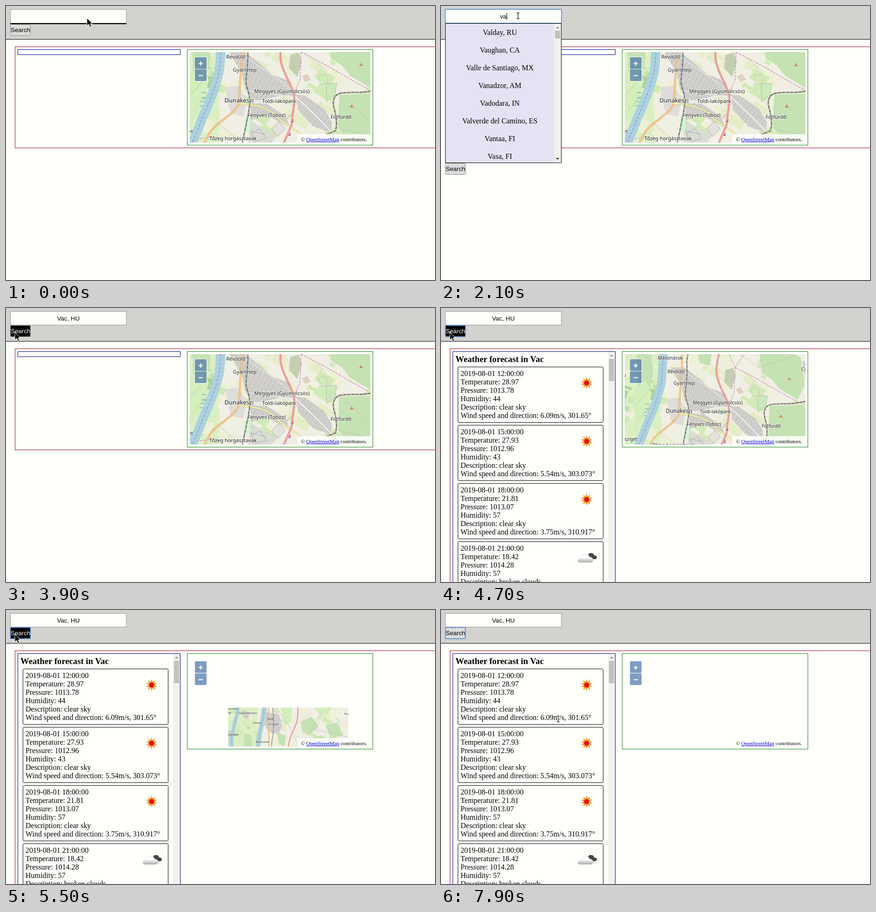
An HTML page for the animation above (8000 ms loop, 922 by 588 pixels).

```html
<!DOCTYPE html>
<html lang="en">
<head>
<meta charset="utf-8">
<style>
html, body { margin: 0; width: 100%; height: 100%; overflow: hidden; background: #fffffc; }
svg { display: block; }
text { white-space: pre; }
.sans { font: 13.33px "Liberation Sans", Arial, sans-serif; }
.serif { font: 16px "Liberation Serif", "Times New Roman", serif; }
.label { font: 11px "Noto Sans", sans-serif; fill: #222; stroke: #fff; stroke-width: 2px; stroke-opacity: .6; paint-order: stroke; text-anchor: middle; }
.mid { text-anchor: middle; }
#map path { fill: none; stroke-linejoin: round; }
</style>
</head>
<body>
<svg width="922" height="588" viewBox="0 0 922 588">
  <defs>
    <clipPath id="view"><rect x="395" y="99" width="388" height="194"/></clipPath>
    <clipPath id="tiles"><rect x="334" y="-69" width="512" height="512"/></clipPath>
    <pattern id="streets" width="9" height="5" patternUnits="userSpaceOnUse" patternTransform="rotate(28)">
      <rect width="9" height="5" fill="#d5d3d0"/>
      <path d="M0 .5H9M.5 0V5" style="stroke:#bdbbb9;stroke-width:.8"/>
    </pattern>
    <g id="arrow"><path d="M0 0V16.5L4 13L6.8 19L9.6 17.7L7 12H12Z" fill="#000" stroke="#fff"/></g>
    <g id="beam">
      <path d="M-3 -6.5H-1L0 -5.5L1 -6.5H3M0 -5.5V5.5M-3 6.5H-1L0 5.5L1 6.5H3" fill="none" stroke="#fff" stroke-width="3"/>
      <path d="M-3 -6.5H-1L0 -5.5L1 -6.5H3M0 -5.5V5.5M-3 6.5H-1L0 5.5L1 6.5H3" fill="none" stroke="#000" stroke-width="1.2"/>
    </g>
    <g id="hand"><path d="M-2 1Q-2 -1 0 -1Q2 -1 2 1V5L8 6.500Q10 7 9.500 10L8 15H-1L-6 9Q-7 7 -5 7L-2 9Z" fill="#000" stroke="#fff" stroke-width="1.1"/></g>
    <g id="sun">
      <path id="rays" fill="#f5a51c" stroke="#c98214" stroke-width=".5"/>
      <circle r="6" fill="#e80c08" stroke="#f6c030"/>
    </g>
    <linearGradient id="mist" x2="0" y2="1"><stop offset=".4" stop-color="#fff"/><stop offset="1" stop-color="#aaa"/></linearGradient>
    <g id="cloud">
      <path d="M0 3Q-4 2 -3 -2Q-1 -5 2 -5Q4 -10 9 -9Q14 -9 15 -4Q21 -4 21 1Q20 4 17 4H2Z" fill="#454545"/>
      <path d="M-16 11Q-21 10 -20 6Q-18 2 -14 2Q-13 -6 -5 -7Q3 -8 5 -1Q13 0 13 7Q12 11 8 11Z" fill="url(#mist)" stroke="#ccc" stroke-width=".6"/>
    </g>
  </defs>
  <g id="page"></g>
  <g clip-path="url(#view)"><g id="map" clip-path="url(#tiles)"></g></g>
  <g id="controls"></g>
  <g id="ui"></g>
</svg>
<script>
const LOOP = 8000;
const $ = id => document.getElementById(id);
const rect = (x, y, w, h, fill, extra = '') => `<rect x="${x}" y="${y}" width="${w}" height="${h}" fill="${fill}" ${extra}/>`;
// A box with a 1px border inside the given bounds
const box = (x, y, w, h, stroke, fill = 'none', r = 0) =>
  rect(x + .5, y + .5, w - 1, h - 1, fill, `stroke="${stroke}" rx="${r}"`);
const text = (x, y, s, cls, extra = '') => `<text x="${x}" y="${y}" class="${cls}" ${extra}>${s}</text>`;
const shape = (d, fill, extra = '') => `<path d="${d}" style="fill:${fill}" ${extra}/>`;
const line = (d, color, width, dash = '') =>
  `<path d="${d}" stroke="${color}" stroke-width="${width}" stroke-dasharray="${dash}"/>`;
const road = (d, edge, color, width) => line(d, edge, width + 1) + line(d, color, width);
const ease = u => u * u * (3 - 2 * u);
const at = (keys, t) => keys.filter(k => k[0] <= t).pop();

$('rays').setAttribute('d', 'M' + Array.from({ length: 20 }, (_, i) => {
  const a = i * Math.PI / 10, r = i % 2 ? 6.5 : 12;
  return (r * Math.sin(a)).toFixed(1) + ' ' + (-r * Math.cos(a)).toFixed(1);
}).join('L') + 'Z');

function fields() {
  let seed = 7, out = '';
  const rnd = () => (seed = seed * 16807 % 2147483647) / 2147483647;
  const west = ['#cdebb0', '#d5eab8', '#eef0d5', '#bfe0a8', '#add19e'];
  const east = ['#eef0d5', '#f2efe9', '#eef0d5', '#e4ecc8', '#d2eab8'];
  for (let i = 0; i < 190; i++) {
    const x = 334 + 512 * rnd(), y = -69 + 370 * rnd();
    const kinds = x < 460 ? west : east;
    out += rect(x, y, 10 + 32 * rnd(), 6 + 20 * rnd(), kinds[rnd() * 5 | 0],
      `transform="rotate(${x < 460 ? 18 : 32} ${x} ${y})"`);
  }
  return out;
}

function drawMap() {
  const danube = 'M488 -70C485 -30 474 10 467 50C459 90 463 120 457 145C447 185 433 215 422 240C414 265 404 282 396 305';
  const arm = 'M376 -70C372 -20 350 20 348 75C350 120 372 150 364 205L348 245';
  const motorway = 'M631 -70C633 -30 628 0 612 27C598 55 588 85 590 114C594 142 612 165 619 190C622 212 614 235 614 255L596 296';
  const mainRoad = 'M507 -70C500 -30 501 10 507 45C512 80 502 150 501 209C488 237 450 250 438 272L424 298';
  const rail = 'M524 -70C529 -20 530 30 519 85C524 130 511 155 518 175C530 205 521 225 516 255L507 298';
  const loop = 'M850 172L783 183C760 188 745 183 720 187C704 190 702 204 704 215C710 235 712 255 708 268L690 275';
  const town = 'url(#streets)', wood = '#c5e2b3', meadow = '#d3efbc';
  const labels = [
    [494, 113, 'Révdűlő'], [513, 141, 'Gyártelep'], [593, 187, 'Meggyes (Gyümölcsös)'], [587, 208, 'Toldi-lakópark'],
    [560, 238, 'Fenyves (Toboz)'], [720, 242, 'Fótfürdő'], [488, 288, 'Tőzeg horgásztavak'], [480, 81, 'Malomárok'],
    [527, 6, 'Alsógöd'], [458, 0, 'Horány'], [417, -42, 'Szigetmonostor'], [813, 107, 'Csomád'],
    [501, 207, 'Dunakeszi', 13], [513, -16, 'Göd', 13], [343, 52, 'Szentendre', 13], [340, 122, 'Pismánytelep'],
    [347, -60, 'Rókusdülő'], [318, -44, 'Leányvölgy'], [372, 273, 'Lupa-sziget'], [865, -38, 'Őrszentmiklós']
  ];
  $('map').innerHTML =
    rect(334, -69, 512, 512, '#f0efe3') + rect(334, -69, 125, 512, '#dcefc4') + fields() +
    shape('M400 40L432 48L440 110L425 175L402 150Z', wood) +
    shape('M395 150L420 130L436 160L420 215L395 255Z', meadow) +
    shape('M540 35L580 50L575 95L550 88Z', wood) +
    shape('M560 -70L606 -70L600 -5L570 10Z', meadow) +
    shape('M642 -10L690 -30L720 10L680 50L650 35Z', wood) +
    shape('M700 -69L780 -69L740 -20Z', meadow) +
    shape('M748 5L800 -5L825 50L770 62Z', wood) +
    shape('M692 60L730 50L790 75L800 140L783 176L740 150L722 128L698 112Z', wood) +
    shape('M716 190L795 188L830 240L800 300L740 290L713 262Z', wood) +
    shape('M611 105L629 100L636 119L626 152L608 133Z', '#c3cfb0') +
    shape('M636 151L648 146L655 158L643 163Z', '#dfd0c2') +
    shape('M688 166L711 166L707 190L689 205Z', '#cbe9bb', 'stroke="#aaa" stroke-width=".7"') +
    shape('M515 237L530 240L529 276L512 268Z', '#d2f5d0') +
    shape('M480 99L514 99L543 121L572 147L612 162L618 196L590 191L545 206L526 196L514 180L507 145Z', town) +
    shape('M470 175L500 170L517 200L510 237L483 231Z', '#deddd9') +
    shape('M525 208L560 210L600 236L612 262L590 250L552 231L526 247Z', town) +
    shape('M622 190L642 192L683 220L701 250L698 272L660 258L628 224Z', town) +
    shape('M526 247L552 262L583 278L570 295L520 295Z', '#d9dcd1') +
    shape('M495 -50L550 -40L565 10L548 44L512 38L488 5Z', town) +
    shape('M334 25L347 32L340 120L334 140Z', town) +
    shape('M395 -58L424 -50L420 -20L398 -28Z', town) +
    shape('M795 84L830 90L836 120L800 125Z', town) +
    shape('M571 264L586 248L600 263L584 280Z', '#e4e2dc', 'stroke="#999" stroke-width=".8"') +
    line('M526 275L545 263L560 284L534 291L526 268L558 276', '#aab', 1) +
    line('M673 158Q671 148 680 146L690 149Q694 158 688 167L678 169Z', '#bbb', .8) +
    line('M397 190L450 130M402 225L440 180M455 250L495 285M620 50L690 99M690 99L783 70M600 20L690 -50M735 -50L690 100M650 105L690 140M730 200L783 250M720 265L770 275', '#bcb9b2', .8) +
    line('M421 186H431M418 205H430M417 214H424M420 197H425', '#5b8fc8', 1) +
    line(danube, '#aad3df', 20) + line(arm, '#aad3df', 15) +
    line(danube, '#a97fb8', 1.2, '6 3') + line(arm, '#a97fb8', 1, '6 3') +
    line('M634 99L632 158C625 175 619 185 616 230L600 245M634 99L690 128L740 157L783 181L846 200M634 99L600 20L540 -69M634 99L690 20L735 -60M690 20L846 58M410 286L450 280', '#cf95cd', 1.5, '5 2') +
    road('M526 207L560 200L601 193L622 194C650 220 676 245 699 270', '#bbb', '#fff', 2) +
    road('M514 180L550 188L593 191M515 110L575 150L621 185', '#ccc', '#fff', 1) +
    road(mainRoad, '#c9853d', '#fbcf93', 2.8) +
    road('M501 209C535 212 565 217 581 237C600 255 615 260 635 277', '#bcb27d', '#f7f5a5', 2.5) +
    road(loop, '#bcb27d', '#f7f5a5', 2) +
    line(loop, '#666', 2.4) + line(loop, '#eee', .9, '5 4') +
    line(rail, '#686868', 2.4) + line(rail, '#eee', .8, '5 5') +
    road(motorway, '#d66a72', '#f2a39b', 3) +
    shape('M763 122L767 129H759ZM743 211L747 218H739Z', '#d08f55') +
    labels.map(([x, y, s, size = 11]) => text(x, y, s, 'label', `style="font-size:${size}px"`)).join('') +
    [[615, 251], [609, 280]].map(p => text(...p, '4', 'label', 'style="fill:#a01030;font-style:italic"')).join('');
}

function drawControls() {
  const white = 'stroke="#fff" stroke-width="2"';
  $('controls').innerHTML =
    box(389, 93, 400, 206, '#148014') +
    rect(404, 108, 29, 55, '#fff', 'rx="4" fill-opacity=".4"') +
    rect(406, 110, 25, 25, '#003c88', 'rx="2" fill-opacity=".5"') +
    rect(406, 136, 25, 25, '#003c88', 'rx="2" fill-opacity=".5"') +
    `<path d="M414 123.500H423M418.500 119V128M414 149.500H423" ${white}/>` +
    rect(626, 275, 157, 18, '#fffffc', 'fill-opacity=".85"') +
    text(634, 290, '© <tspan fill="#00e" text-decoration="underline">OpenStreetMap</tspan> contributors.', 'serif', 'style="font-size:11.2px"');
}

const reports = [
  ['12', 28.97, 1013.78, 44, 'clear sky', '6.09m/s, 301.65°'],
  ['15', 27.93, 1012.96, 43, 'clear sky', '5.54m/s, 303.073°'],
  ['18', 21.81, 1013.07, 57, 'clear sky', '3.75m/s, 310.917°'],
  ['21', 18.42, 1014.28, 57, 'broken clouds', '']
];
const card = ([hour, temp, pressure, humidity, sky, wind], i) => {
  const y = 126 + 125 * i;
  const rows = [`2019-08-01 ${hour}:00:00`, `Temperature: ${temp}`, `Pressure: ${pressure}`, `Humidity: ${humidity}`,
    `Description: ${sky}`, `Wind speed and direction: ${wind}`];
  return box(36, y, 313, 120, '#000', 'none', 2) +
    rows.map((s, n) => text(42, y + 20 + 18 * n, s, 'serif')).join('') +
    `<use href="#${sky == 'clear sky' ? 'sun' : 'cloud'}" x="${sky == 'clear sky' ? 313 : 314}" y="${y + (i < 3 ? 35 : 34)}"/>`;
};

function drawPage(loaded) {
  const panel = box(25, 93, 350, loaded ? 600 : 12, '#00008b');
  $('page').innerHTML = rect(0, 0, 922, 71, '#d2d3cf') + rect(0, 71, 922, 1, '#000') +
    box(19, 87, 960, loaded ? 700 : 218, '#9c0a38') + panel +
    (loaded ? text(31, 116, 'Weather forecast in Vac', 'serif', 'style="font-size:18.72px;font-weight:bold"') +
      reports.map(card).join('') + rect(359, 94, 15, 494, '#f1f1ef') + rect(361, 109, 11, 48, '#c1c1bf') +
      shape('M362.500 104L366.500 100L370.500 104Z', '#999') : '');
}

const lists = [
  [1800, 17, 'Vinogradovo, RU', 'Vavibet, IN', 'Villa del Carbon, MX', 'Villeneuve, FR', 'Vyshneve, UA', 'Valday, RU', 'Villanueva de la Cañada, ES', 'Vienna, AT'],
  [2100, 17, 'Valday, RU', 'Vaughan, CA', 'Valle de Santiago, MX', 'Vanadzor, AM', 'Vadodara, IN', 'Valverde del Camino, ES', 'Vantaa, FI', 'Vasa, FI'],
  [2600, 68, 'Vac, HU', 'Vacha, RU', 'Vacoas, MU', 'Vacy, AU', 'Vacognes-Neuilly, FR', 'Vacognes-Neuilly, FR', 'Vacha, DE', 'Vachdorf, DE']
];
function dropdown(t) {
  const [, thumb, ...items] = at(lists, t), hover = t >= 2800;
  return box(9, 37, 250, 300, '#000', '#e4e3f3') +
    (hover ? rect(10, 38, 233, 38, '#000') : '') +
    items.map((s, i) => text(126.5, 62 + 38 * i, s, 'serif mid', hover && !i ? 'fill="#e4e3f3"' : '')).join('') +
    rect(243, 38, 15, 298, '#f1f1ef') + rect(245, 53, 11, thumb, '#c1c1bf') +
    shape('M246.500 48L250.500 44L254.500 48Z', '#999') + shape('M246.500 326L250.500 330L254.500 326Z', '#444');
}

// Typed value with its caret offset from the centre; no offset means no caret
const typed = [[0, ''], [500, '', 0], [1100, ''], [1600, 'v', 3.5], [2000, 'va', 7], [2600, 'vac', 10.5], [3100, 'Vac, HU']];
const cursor = [
  [0, 'arrow', 174, 26], [100, 'beam', 176, 26], [400, 'beam', 170, 23], [500, 'beam', 164, 20], [1500, 'beam', 165.5, 21],
  [2700, 'beam', 152, 28], [2800, 'hand', 138, 45], [2900, 'hand', 130, 44], [3100, 'arrow', 129, 44],
  [3300, 'arrow', 120, 52], [3400, 'arrow', 98, 65], [3500, 'arrow', 70, 71], [3600, 'arrow', 42, 66], [3700, 'arrow', 18, 53],
  [3900, 'arrow', 19, 52], [6600, 'arrow', 73, 98], [6800, 'arrow', 122, 134], [6900, 'arrow', 171, 164],
  [7600, 'arrow', 192, 190], [7700, 'arrow', 216, 220], [7800, 'arrow', 238, 239], [7900, 'beam', 252, 234]
];

function drawUI(t) {
  const focus = t >= 400 && t < 3100, open = t >= 1800 && t < 3100;
  const hover = t >= 3700 && t < 6600, pressed = t >= 4300;
  const y = open ? 337 : t < 3100 ? 39 : 37;
  const ring = (x, y, w, h) => rect(x, y, w, h, 'none', 'rx="1.500" stroke="#5f94dc" stroke-width="2" stroke-opacity=".85"');
  const [, value, caret] = at(typed, t), [, kind, x0, y0] = at(cursor, t);
  $('ui').innerHTML =
    (t < 3100 ? rect(9, 37, 250, 2, '#000') : '') +
    box(9, 7, 250, 30, '#9a9a98', '#fffffc') + (focus ? ring(9, 7, 250, 30) : '') +
    text(134, 27, value, 'sans mid') +
    (caret === undefined ? '' : rect(Math.round(134 + caret - .5), 15, 1, 15, '#000')) +
    (open ? dropdown(t) : '') +
    box(9, y, 44, 25, '#8c8c8a', hover ? '#000' : '#dcdcda', 2) + (pressed ? ring(9.5, y + .5, 43, 24) : '') +
    text(10, y + 17, 'Search', 'sans', hover ? 'fill="#fffffc"' : '') +
    `<use href="#${kind}" x="${x0}" y="${y0}"/>`;
}

// Flight clock: page time to elapsed flight time
const flight = [[4500, 0], [4700, 240], [5100, 594], [5400, 966], [5500, 1066], [5800, 1200], [LOOP, 1300]];
function moveMap(t) {
  let v = 0;
  flight.forEach(([b, w], i) => {
    const [a, u] = flight[i - 1] || [0, 0];
    if (t >= a && t < b) v = u + (w - u) * (t - a) / (b - a);
  });
  const zoom = v < 1000 ? -ease(v / 1000) : ease(v / 1000 - 1) - 1;
  const p = ease(v / 2000);
  $('map').setAttribute('transform', `translate(589 196) scale(${2 ** zoom}) translate(${62 * p - 589} ${530 * p - 196})`);
  $('map').style.display = t < 5900 ? '' : 'none';
}

drawMap();
drawControls();
const start = performance.now();
function frame() {
  const t = Math.max(0, performance.now() - start) % LOOP;
  drawPage(t >= 4600);
  moveMap(t);
  drawUI(t);
  requestAnimationFrame(frame);
}
frame();
</script>
</body>
</html>
```
